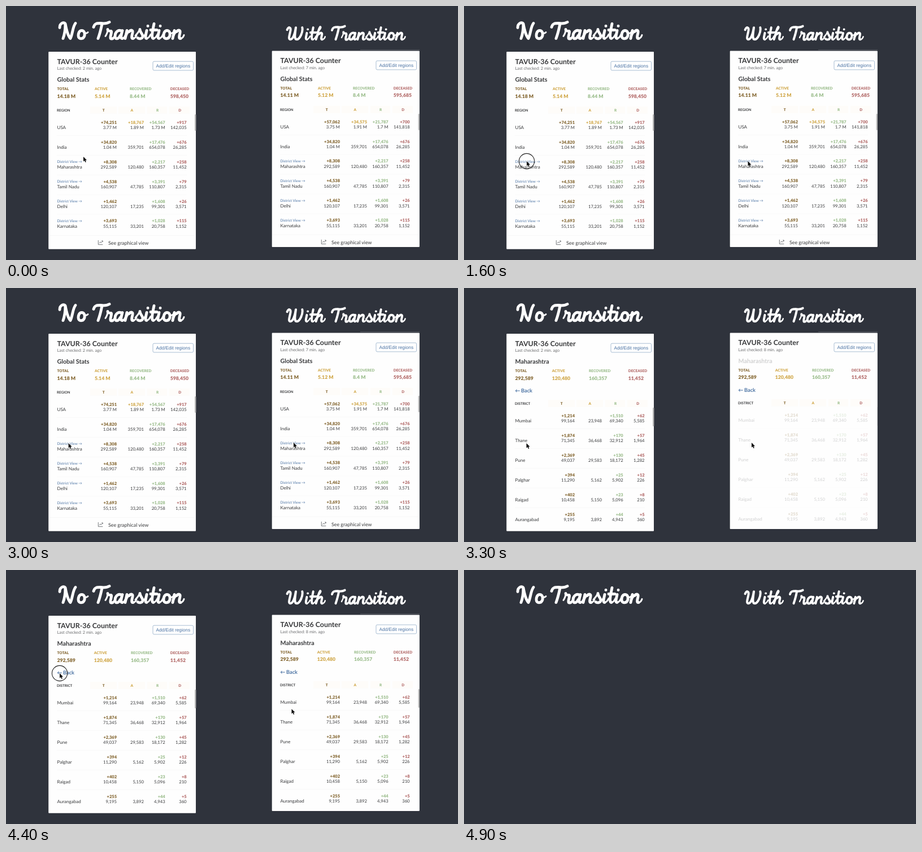
These frames come from a looping animation (800 by 450 pixels, 5000 ms). An HTML page:

```html
<!DOCTYPE html>
<html lang="en">
<head>
<meta charset="utf-8">
<title>Page transitions compared</title>
<style>
html, body { margin: 0; width: 100%; height: 100%; overflow: hidden; background: #2f333c; }
svg { display: block; width: 800px; height: 450px; }
text { font-family: Lato, "DejaVu Sans", sans-serif; text-rendering: geometricPrecision; white-space: pre; }
.script { fill: none; stroke: #fff; stroke-linecap: round; stroke-linejoin: round; }
.stem { stroke-width: 4.9; }
.join { stroke-width: 3; }
</style>
</head>
<body>
<svg id="stage" viewBox="0 0 800 450"></svg>
<script>
const LOOP = 5000, STEP = 100;
const OPEN = 3100, BACK = 4500, END = 4900, FADE = 600;
const INK = '#38393b', BLUE = '#4a72a3';
const HUES = ['#83652f', '#d0a748', '#9bbd8c', '#b36a69'];
const RIGHT_EDGE = [196, 244, 281.7, 319.6];
const HEAD_X = [172.6, 222.8, 268, 307.6];
const CELLS = [[149, 47], [199, 47], [250, 35], [289, 36]];

// Brush lettering, baseline at 0: heavy stems, then thin joins.
const PEN = {
  N: ['M2-20C2-28 9-31 12-27C12-18 11-9 8-1M12-27C14-16 17-5 21-1C25-9 25-22 30-28', ''],
  W: ['M2-22C5-30 11-28 9-19C7-9 4-1 9-1C15-1 19-14 21-27C19-12 17-1 23-1C30-1 37-18 35-27', ''],
  T: ['M4-21C6-28 10-28 16-28C22-27 27-27 32-30M19-27C17-17 15-9 12-1', ''],
  h: ['M10-28C7-26 4-10 1-1M8-13C11-17 15-16 14-11C13-7 11 0 15-1',
    'M1-16C8-18 15-29 10-29M1-1C3-7 5-11 8-13M15-1C18-1 20-4 21-7'],
  r: ['M4-17C4-14 7-14 10-14C12-13 8-4 9-2C9 0 11 0 13-1', 'M0-5C2-8 4-13 4-17M13-1C15-3 17-6 18-8'],
  a: ['M13-14C7-18 1-12 1-5C1 1 7 1 10-6M14-15C12-8 10 0 14-1', 'M10-6L13-13M14-1C17-1 18-4 20-8'],
  n: ['M4-15L1-1M8-13C11-17 15-16 14-11C13-7 11 0 15-1', 'M1-1C3-7 5-11 8-13M15-1C18-1 20-4 21-7'],
  s: ['M8-17C8-12 14-8 13-4C12 0 6 0 4-2', 'M0-6C3-9 6-13 8-17M13-4C15-5 17-7 18-9'],
  i: ['M4-15C3-9 0-1 4-1M6-23h.1', 'M4-1C7-1 9-4 11-8'],
  t: ['M7-27C5-17 1-1 6-1M1-16H12', 'M6-1C9-1 11-4 13-8'],
  o: ['M7-15C2-15 1-9 1-6C1 1 10 1 12-6C13-11 11-15 7-15', 'M11-13C13-9 16-10 18-12']
};
const TRANSITION = [0, 25, 41, 59, 78, 94, 104, 116, 127, 143];

const letters = (word, xs) => [...word].map((c, i) =>
  `<g transform="translate(${xs[i]})"><path class="stem" d="${PEN[c][0]}"/><path class="join" d="${PEN[c][1]}"/></g>`).join('');

function heading(first, xs, wordX, x, y, scale) {
  return `<g class="script" role="img" aria-label="${first} Transition" transform="translate(${x} ${y}) scale(${scale})">` +
    letters(first, xs) +
    `<g transform="translate(${wordX})">${letters('Transition', TRANSITION)}</g></g>`;
}

const text = (s, x, y, size, fill = INK, weight = 400, anchor = 'start', extra = '') =>
  `<text x="${x}" y="${y}" font-size="${size}" fill="${fill}" font-weight="${weight}" text-anchor="${anchor}" ${extra}>${s}</text>`;

const rect = (x, y, w, h, fill, extra = '') =>
  `<rect x="${x}" y="${y}" width="${w}" height="${h}" fill="${fill}" ${extra}/>`;

function stats(values, xs) {
  return ['TOTAL', 'ACTIVE', 'RECOVERED', 'DECEASED'].map((name, i) =>
    text(name, xs[i], 149.4, 6.5, HUES[i], 900) +
    text(values[i], xs[i], 162.6, 8.7, HUES[i], 900)).join('');
}

function tableHead(name, y) {
  return CELLS.map(([x, w]) => rect(x, y - 8.5, w, 12.5, '#fefcf9')).join('') +
    text(name, 90, y, 6.2, INK, 700) +
    [...'TARD'].map((c, i) => text(c, HEAD_X[i], y, 6.4, HUES[i], 900, 'middle')).join('');
}

// Row format: name | four changes | four totals
function rows(list, top, linked) {
  return list.map((row, i) => {
    const [name, ...cells] = row.split('|');
    const y = top + i * 34.95;
    let out = text(name, 90.5, y, 8);
    if (linked && i > 1) out += text('District View →', 90.5, y - 9.8, 6.4, BLUE);
    if (i < list.length - 1) out += rect(90, y + 11, 230, .6, '#f5f5f5');
    for (let k = 0; k < 4; k++) {
      out += text(cells[k], RIGHT_EDGE[k], y - 9.3, 7.5, HUES[k], 900, 'end') +
        text(cells[k + 4], RIGHT_EDGE[k], y, 7.7, INK, 400, 'end');
    }
    return out;
  }).join('');
}

const STATES = [
  'India|+34,820||+17,476|+676|1.04 M|359,701|654,078|26,285',
  'Maharashtra|+8,308||+2,217|+258|292,589|120,480|160,357|11,452',
  'Tamil Nadu|+4,538||+3,391|+79|160,907|47,785|110,807|2,315',
  'Delhi|+1,462||+1,608|+26|120,107|17,235|99,301|3,571',
  'Karnataka|+3,693||+1,028|+115|55,115|33,201|20,758|1,152'
];
const DISTRICTS = [
  'Mumbai|+1,214||+1,510|+62|99,164|23,948|69,340|5,585',
  'Thane|+1,874||+170|+57|71,345|36,468|32,912|1,964',
  'Pune|+2,369||+130|+45|49,037|29,583|18,172|1,282',
  'Palghar|+394||+25|+12|11,290|5,162|5,902|226',
  'Raigad|+402||+23|+8|10,458|5,150|5,096|210',
  'Aurangabad|+255||+44|+5|9,195|3,892|4,943|360'
];

const thumb = (x, y, h) => rect(x, y, 2.4, h, '#b9b9b9', 'rx="1"');

function worldPage(p) {
  return text('Global Stats', 90.5, 134, 10.7, INK, 700) +
    stats(p.totals, [90.5, 157, 219, 290.7]) +
    tableHead('REGION', 186.7) +
    rows([p.usa, ...STATES], 218, true) +
    rect(76, 406, 258, .6, '#f3f3f3') +
    '<path d="M163.3 415v7.7h8M165 420.3l2-2.3 1.5 1.5 2.5-3.2M169.2 416h2v2" fill="none" stroke="#55585c" stroke-width=".8"/>' +
    text('See graphical view', 181, 423, 8.85) +
    thumb(p.thumbX, 192, 29);
}

function districtPage(p) {
  return stats(['292,589', '120,480', '160,357', '11,452'], [90.5, 155.7, 221, 290.7]) +
    text('←', 90.2, 185.3, 9, BLUE, 700) + text('Back', 101, 185.3, 9.2, BLUE, 700) +
    tableHead('DISTRICT', 206.7) +
    `<g id="${p.id}Fade">` + text('Maharashtra', 90.5, 134, 10.7, INK, 700) +
    rows(DISTRICTS, 238.2, false) + thumb(p.thumbX, 212, 33) + '</g>';
}

const ARROW = 'M0 0V8.6L2 6.7L3.4 9.9L4.8 9.3L3.5 6.2H6.1Z';

function panel(p) {
  const [x, y, w, h] = p.card;
  return `<g id="${p.id}">` + (p.edge || '') +
    `<clipPath id="${p.id}Clip">${rect(x, y, w, h, '#fff')}</clipPath>` +
    rect(x, y, w, h, '#fefefe', 'rx="1"') +
    `<g transform="translate(${p.dx} ${p.dy})">` +
    text('TAVUR-36 Counter', 90.5, 102.6, 12.4, INK, 700) +
    text('', 90.5, 113.3, 7.35, '#6a6b6d', 400, 'start', `id="${p.id}Age"`) +
    rect(260, 98.2, 71.5, 15.8, '#fff', 'rx="2" stroke="#9fb6ce" stroke-width=".9"') +
    text('Add/Edit regions', 295.8, 109, 8.25, BLUE, 400, 'middle',
      'style="font-family:\'Liberation Sans\',Arial,sans-serif"') +
    `<g id="${p.id}World">${worldPage(p)}</g><g id="${p.id}District">${districtPage(p)}</g></g>` +
    `<g clip-path="url(#${p.id}Clip)"><g id="${p.id}Cursor">` +
    `<circle id="${p.id}Ring" r="13.6" fill="none" stroke="#222" stroke-width="1.1"/>` +
    `<path d="${ARROW}" fill="#080808" stroke="#fff" stroke-width=".8" paint-order="stroke"/></g></g></g>`;
}

const panels = [
  {
    id: 'plain', dx: 0, dy: 0, card: [75.2, 81, 260.8, 349.7], thumbX: 334,
    totals: ['14.18 M', '5.14 M', '8.44 M', '598,450'],
    usa: 'USA|+74,251|+18,767|+54,567|+917|3.77 M|1.89 M|1.73 M|142,035',
    age: [2, 2], back: BACK, fade: 0, rings: [[1500, 1700], [4300, 4500]],
    path: [[600, 137, 267], [1200, 111, 275], [2400, 111, 275], [3300, 110.5, 275],
      [3800, 109, 275], [4300, 95, 183], [4500, 95, 183], [4800, 101.7, 228.5]]
  },
  {
    id: 'smooth', dx: 395, dy: -1.1, card: [470.7, 79.4, 261.2, 347.6], thumbX: 334.6,
    edge: rect(627, 77, 105, 1.2, '#50545c'),
    totals: ['14.11 M', '5.12 M', '8.4 M', '595,685'],
    usa: 'USA|+57,062|+34,575|+21,787|+700|3.75 M|1.91 M|1.7 M|141,818',
    age: [7, 8], back: LOOP, fade: FADE, rings: [],
    path: [[800, 462, 290], [1300, 502.5, 275], [2500, 502.5, 275], [3000, 509, 274],
      [4200, 509, 274], [4700, 498, 187]]
  }
];

const $ = id => document.getElementById(id);
$('stage').innerHTML = rect(0, 0, 800, 450, '#2f333c') +
  heading('No', [0, 34], 58, 93, 58.5, 1) +
  heading('With', [0, 41, 52, 64], 96, 496, 60, .81) +
  panels.map(panel).join('');

const ease = u => u < .5 ? 2 * u * u : 1 - 2 * (1 - u) ** 2;
const clamp = u => Math.min(1, Math.max(0, u));
const show = (id, on) => $(id).setAttribute('visibility', on ? 'inherit' : 'hidden');

function along(path, t) {
  let a = path[0];
  for (const b of path) {
    if (t < b[0]) {
      const u = b === a ? 0 : ease(clamp((t - a[0]) / (b[0] - a[0])));
      return [a[1] + (b[1] - a[1]) * u, a[2] + (b[2] - a[2]) * u];
    }
    a = b;
  }
  return [a[1], a[2]];
}

function draw(t) {
  for (const p of panels) {
    const inside = t >= OPEN && t < p.back;
    $(p.id).setAttribute('display', t < END ? 'inline' : 'none');
    show(p.id + 'World', !inside);
    show(p.id + 'District', inside);
    $(p.id + 'Fade').setAttribute('opacity', p.fade ? ease(clamp((t - OPEN) / p.fade)) : 1);
    $(p.id + 'Age').textContent = `Last checked: ${p.age[t < OPEN ? 0 : 1]} min. ago`;
    $(p.id + 'Cursor').setAttribute('transform', `translate(${along(p.path, t)})`);
    show(p.id + 'Ring', p.rings.some(([a, b]) => t >= a && t < b));
  }
}

function tick() {
  draw(Math.floor(performance.now() % LOOP / STEP) * STEP);
  requestAnimationFrame(tick);
}
tick();
</script>
</body>
</html>
```
